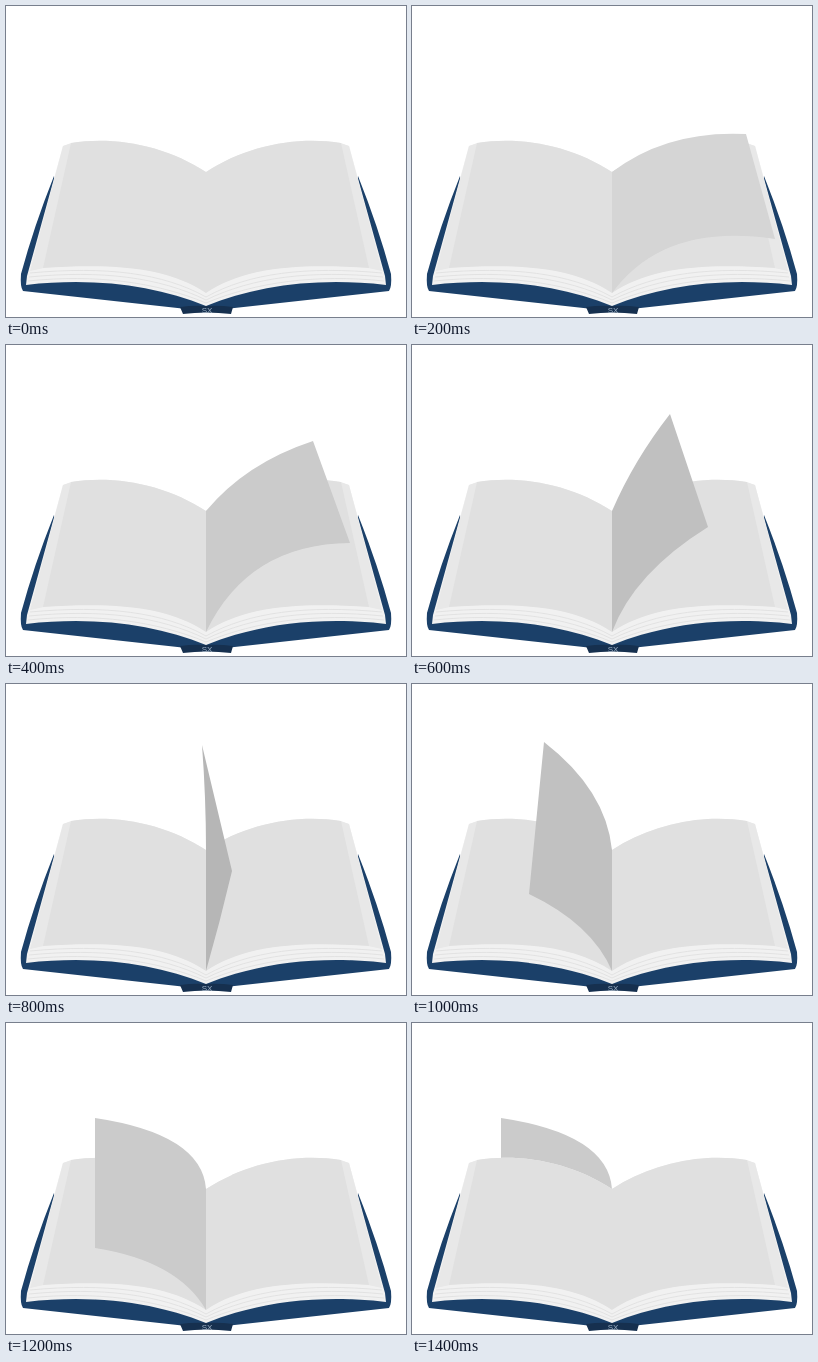
Recreate the animation shown at these times as an HTML page. Size 400 by 311 pixels, loop 1.6 s.

```html
<!DOCTYPE html>
<html lang="en">
<head>
<meta charset="utf-8">
<title>Turning page</title>
<style>
  html, body { margin: 0; width: 100%; height: 100%; overflow: hidden; background: #fff; }
  svg { display: block; width: 100%; height: 100%; }
  .edge { fill: none; stroke: #dfdfdf; stroke-width: .8; }
</style>
</head>
<body>
<svg viewBox="0 0 400 311">
  <defs>
    <g id="cover">
      <path fill="#1b4069" d="M48 170Q28 220 15 268Q14 281 17 285L176 302.500H201V290L60 255Z"/>
    </g>
    <g id="leaf">
      <path fill="#f1f1f1" d="M57 140L65 137C110 130 160 140 200 166V300C150 280 90 271 20 279L21 270Z"/>
      <path fill="#e8e8e8" d="M57 140L66 137L38 262L24 265Z"/>
      <path class="edge" d="M22 275C90 268 150 276 200 297M23 271C95 264 153 271 200 294M24 267C100 260 157 267 200 291"/>
      <path fill="#e0e0e0" d="M65 137C110 130 160 140 200 166V287C163 262 110 257 37 262Z"/>
    </g>
  </defs>
  <use href="#cover"/>
  <use href="#cover" transform="matrix(-1 0 0 1 400 0)"/>
  <path fill="#16304f" d="M174 301Q187 299 200 300Q213 299 227 301L225 308Q200 305 177 308Z"/>
  <text x="201" y="307" text-anchor="middle" font-family="'Liberation Sans', sans-serif" font-size="8" fill="#9fb2c6">SX</text>
  <g id="behind"></g>
  <use href="#leaf"/>
  <use href="#leaf" transform="matrix(-1 0 0 1 400 0)"/>
  <g id="front"><path id="page"/></g>
</svg>
<script>
const STEP = 200;
const page = document.getElementById('page');
const front = document.getElementById('front');
const behind = document.getElementById('behind');

// Each pose: top control, top corner, bottom corner, bottom control, shade
const poses = [
  null,
  ['255 124', '334 128', '363 233', '252 216', '#d5d5d5'],
  ['240 118', '307 96', '344 198', '242 199', '#cbcbcb'],
  ['222 115', '258 69', '296 182', '222 228', '#c0c0c0'],
  ['200 114', '196 61', '226 187', '214 238', '#b6b6b6'],
  ['194 106', '132 58', '117 210', '180 240', '#c1c1c1'],
  ['196 111', '89 95', '89 225', '172 238', '#cbcbcb'],
];
poses.push(poses[6]); // the turned page slips under the left leaf

function draw(now) {
  const i = Math.floor(now / STEP) % poses.length;
  const pose = poses[i];
  if (pose) {
    const [topCtl, top, bottom, bottomCtl, shade] = pose;
    page.setAttribute('d', `M200 166Q${topCtl} ${top}L${bottom}Q${bottomCtl} 200 287Z`);
    page.setAttribute('fill', shade);
  } else {
    page.setAttribute('d', '');
  }
  const layer = i === 7 ? behind : front;
  if (page.parentNode !== layer) layer.append(page);
}

let start;
function tick(now) {
  start ??= now;
  draw(now - start);
  requestAnimationFrame(tick);
}
draw(0);
requestAnimationFrame(tick);
</script>
</body>
</html>
```
